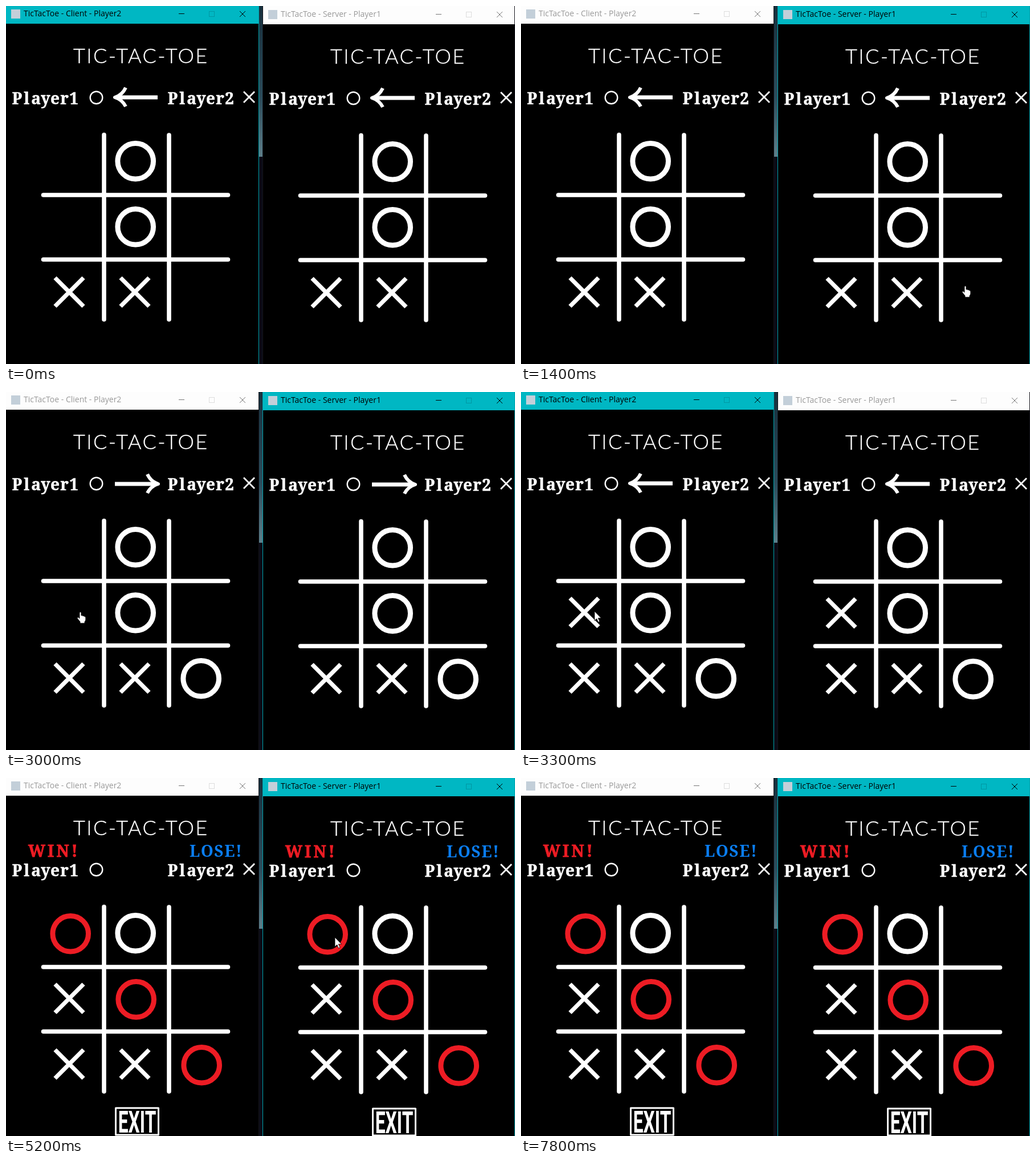
Write an HTML page that moves like this. It is 893 px wide and 627 px high and loops after 7.9 s.

```html
<!DOCTYPE html>
<html lang="en">
<head>
<meta charset="utf-8">
<title>Tic-Tac-Toe</title>
<style>
  html, body { margin: 0; width: 100%; height: 100%; overflow: hidden; background: #000; }
  svg { display: block; width: 893px; height: 627px; }
  .window { --bar: #fdfdfd; --edge: #14141b; --caption: #999; --control: #777; --disabled: #ddd; }
  .window.active { --bar: #00b7c3; --edge: #00a3ae; --caption: #000; --control: #000; --disabled: #0097a3; }
  .bar { fill: var(--bar); }
  .edge { fill: var(--edge); }
  .caption { font: 14px "Open Sans", "Noto Sans", sans-serif; fill: var(--caption); }
  .control { fill: none; stroke: var(--control); }
  .disabled { fill: none; stroke: var(--disabled); }
  .heading { font: 300 36px Lato, "Open Sans", sans-serif; letter-spacing: 2.4px; fill: #fff; stroke: #fff; stroke-width: .4; }
  .player { font: bold 28px "Noto Serif", "DejaVu Serif", serif; fill: #fff; stroke: #fff; stroke-width: .5; text-anchor: middle; }
  .result { font: bold 28px "Noto Serif", "DejaVu Serif", serif; }
  .exit { font: bold 53px Roboto, "Liberation Sans", sans-serif; fill: #fff; text-anchor: middle; }
  .line { fill: none; stroke: #fff; stroke-linejoin: round; }
  .grid { stroke-width: 7.6; stroke-linecap: round; }
  .o { fill: none; stroke: #fff; stroke-width: 9; }
  .x { fill: none; stroke: #fff; stroke-width: 7.4; }
  .won { stroke: #ed1c24; transform: translate(1px, 1px); }
</style>
</head>
<body>
<svg viewBox="0 0 893 627">
  <defs>
    <linearGradient id="sky" x1="0" y1="0" x2="0" y2="1">
      <stop offset="0" stop-color="#17303d"/>
      <stop offset=".6" stop-color="#2b4d5c"/>
      <stop offset="1" stop-color="#5d7f8a"/>
    </linearGradient>
    <g id="game">
      <text class="heading" x="118" y="100">TIC-TAC-TOE</text>
      <g id="names"></g>
      <circle class="line" cx="158.5" cy="160.5" r="10.8" stroke-width="2.4"/>
      <path class="line" d="M417 150L436 169M436 150L417 169" stroke-width="2.8"/>
      <g id="toLeft" class="line">
        <path d="M194 160H266" stroke-width="7"/>
        <path d="M210 143Q204 156 191 160Q204 164 210 176" stroke-width="6"/>
      </g>
      <g id="toRight" class="line">
        <path d="M191 161H264" stroke-width="7"/>
        <path d="M248 144Q254 157 267 161Q254 165 248 177" stroke-width="6"/>
      </g>
      <path class="line grid" d="M172 225.5V549M286 226V549M65.5 331H389.5M65.5 444H389.5"/>
      <g id="marks"></g>
      <g id="ending">
        <text class="result" x="39" y="138" fill="#ed1c24" stroke="#ed1c24" stroke-width=".8" letter-spacing="4.2">WIN!</text>
        <text class="result" x="322" y="138" fill="#0a7df0" letter-spacing="1.5">LOSE!</text>
        <rect class="line" x="192.5" y="578" width="75" height="47" stroke-width="3"/>
        <text class="exit" transform="translate(230 621) scale(.6 1)">EXIT</text>
      </g>
    </g>
    <g id="frame">
      <rect class="bar" width="443" height="31"/>
      <rect x="9" y="6" width="16" height="16" fill="#c3cfd9"/>
      <path class="control" d="M303 13.5H313M410 9L420 19M420 9L410 19"/>
      <rect class="disabled" x="356.5" y="9.5" width="9" height="9"/>
    </g>
  </defs>

  <rect width="893" height="627"/>
  <rect x="443" width="8" height="264" fill="url(#sky)"/>
  <rect x="443" y="264" width="8" height="363" fill="#0b0b16"/>

  <g id="client" class="window">
    <use href="#frame"/>
    <text class="caption" x="31" y="18">TicTacToe - Client - Player2</text>
    <rect class="edge" x="443" width="1" height="627"/>
    <use href="#game"/>
  </g>
  <g id="server" class="window">
    <use href="#frame" transform="translate(451 1)"/>
    <rect class="bar" x="451" width="442" height="1"/>
    <text class="caption" x="482" y="19">TicTacToe - Server - Player1</text>
    <rect class="edge" x="450" width="1" height="627"/>
    <rect class="edge" x="892" width="1" height="627"/>
    <use href="#game" transform="translate(451 1)"/>
  </g>

  <g id="pointer" fill="#fff" stroke="#000" stroke-width=".8">
    <path id="arrow" d="M0 0V16.5L3.8 13L6.4 19L9 17.9L6.4 12H11.6Z"/>
    <path id="hand" d="M-2 1.5Q-.5-.8 1 1.5V6.5Q2.8 5.5 3.7 7.2Q5.4 6.4 6.2 8Q8.6 7.6 8.8 10V13.5Q8.6 16 7 17.5V20H-1V17.5L-5.8 11.5Q-6.4 9.4-4 9.6L-2 11.5Z"/>
  </g>
</svg>
<script>
  const LOOP = 7900, STEP = 100, PITCH = 115, WIN_AT = 4600;
  const $ = id => document.getElementById(id);
  const show = (el, on) => { el.style.display = on ? "" : "none"; };

  // kind, column, row, time placed, part of the winning line
  const moves = [
    ["o", 1, 0, 0], ["o", 1, 1, 0, true], ["x", 0, 2, 0], ["x", 1, 2, 0],
    ["o", 2, 2, 1500, true], ["x", 0, 1, 3300], ["o", 0, 0, WIN_AT, true]
  ];

  // time, x, y
  const path = [
    [800, 700, 640], [1200, 780, 490], [1700, 780, 490], [2100, 640, 560],
    [2700, 131, 385], [3200, 131, 385], [3300, 129, 384], [3500, 129, 384],
    [4300, 579, 280], [4500, 579, 280], [4600, 577, 279], [5700, 577, 279],
    [6500, 600, 640]
  ];

  // Typewriter spacing: each letter centred in an equal slot
  const typed = (word, x) => [...word].map((c, i) =>
    `<text class="player" x="${x + i * 16.6}" y="172">${c}</text>`).join("");
  $("names").innerHTML = typed("Player1", 19.5) + typed("Player2", 292.5);

  $("marks").innerHTML = moves.map(([kind, col, row]) => {
    const x = col * PITCH, y = row * PITCH;
    return kind === "o"
      ? `<circle class="o" cx="${112.2 + x}" cy="${271.8 + y}" r="31.3"/>`
      : `<path class="x" d="M${86 + x} ${246 + y}l50 50m0-50l-50 50"/>`;
  }).join("");
  const marks = [...$("marks").children];

  function cursorAt(t) {
    const i = path.findIndex(p => p[0] > t);
    if (i < 1) return null;
    const [t0, x0, y0] = path[i - 1], [t1, x1, y1] = path[i];
    const k = (t - t0) / (t1 - t0), e = k * k * (3 - 2 * k);
    return [x0 + (x1 - x0) * e, y0 + (y1 - y0) * e];
  }

  function canPlay(x, y, t, turn) {
    const server = x >= 451;
    if (t >= WIN_AT || server !== (turn === 1)) return false;
    const col = Math.floor((x - (server ? 451 : 0) - 57) / PITCH);
    const row = Math.floor((y - 216) / PITCH);
    const inside = col >= 0 && col < 3 && row >= 0 && row < 3;
    return inside && !moves.some(m => m[1] === col && m[2] === row && t >= m[3]);
  }

  function render(t) {
    const over = t >= WIN_AT;
    const turn = t >= 1500 && t < 3300 ? 2 : 1;
    const clientActive = t < 1400 || (t >= 3200 && t < 4500);
    $("client").classList.toggle("active", clientActive);
    $("server").classList.toggle("active", !clientActive);
    show($("toLeft"), !over && turn === 1);
    show($("toRight"), !over && turn === 2);
    show($("ending"), over);
    moves.forEach((m, i) => {
      show(marks[i], t >= m[3]);
      marks[i].classList.toggle("won", over && !!m[4]);
    });

    const at = cursorAt(t);
    show($("pointer"), at);
    if (at) {
      const hand = canPlay(...at, t, turn);
      show($("hand"), hand);
      show($("arrow"), !hand);
      $("pointer").setAttribute("transform", `translate(${at.map(Math.round)})`);
    }
  }

  const start = performance.now();
  function tick() {
    const t = (performance.now() - start) % LOOP;
    render(Math.floor(t / STEP) * STEP);
    requestAnimationFrame(tick);
  }
  tick();
</script>
</body>
</html>
```
